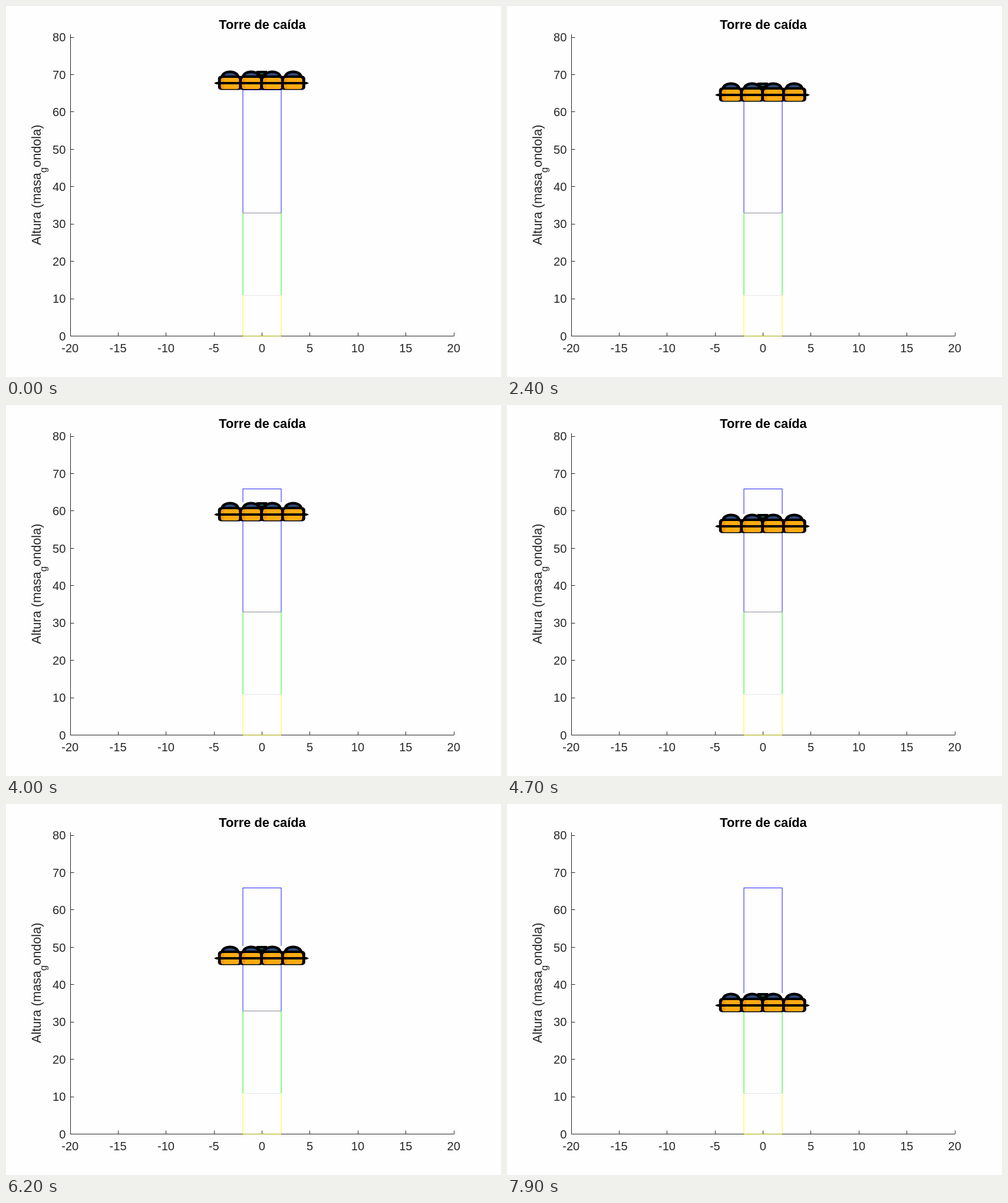
Write an HTML page that moves like this. It is 840 px wide and 630 px high and loops after 8000 ms.

```html
<!DOCTYPE html>
<html lang="es">
<head>
<meta charset="utf-8">
<title>Torre de caída</title>
<style>
  html, body { margin: 0; width: 100%; height: 100%; overflow: hidden; background: #fefefe; }
  svg { display: block; width: 840px; height: 630px; }
  text { font-family: "Liberation Sans", Arial, sans-serif; font-size: 20px; fill: #262626; }
  .title { font-size: 21.8px; font-weight: bold; fill: #000; text-anchor: middle; }
  .label { font-size: 21.7px; }
  .sub { font-size: 16.5px; }
  .x { text-anchor: middle; }
  .y { text-anchor: end; }
  .axes { stroke: #262626; fill: none; }
</style>
</head>
<body>
<svg viewBox="0 0 840 630">
  <defs>
    <g id="car">
      <path d="M-16 120C-14 106 14 106 16 120Z"/>
      <path d="M-10 118C-7 112.5 7 112.5 10 118Z" fill="#2f4b7c"/>
      <rect x="-20.5" y="118.5" width="41" height="24" rx="5"/>
      <rect x="-15.5" y="122" width="31" height="19" rx="4" fill="#ffab12"/>
      <path d="M-10 122h-1.5a4 4 0 0 0-4 4v11a4 4 0 0 0 4 4h1.5z" fill="#ee9a18"/>
    </g>
  </defs>

  <text class="title" x="435" y="39">Torre de caída</text>
  <text class="label" transform="translate(59 406) rotate(-90)">Altura (masa<tspan class="sub" dy="9.5">g</tspan><tspan dy="-9.5">ondola)</tspan></text>

  <path id="axes" class="axes"/>
  <g id="ticks"></g>

  <g id="tower" fill="none"></g>

  <g id="gondola">
    <rect x="354" y="110" width="160" height="32" fill="#fefefe"/>
    <path d="M425 110h18v9h-18z"/>
    <path d="M431 114h6v2h-6z" fill="#1c5560"/>
    <use href="#car" x="380.2"/>
    <use href="#car" x="416"/>
    <use href="#car" x="451.8"/>
    <use href="#car" x="487.3"/>
    <path d="M353 131l4-2h153l4 2l-4 2H357z"/>
  </g>
</svg>
<script>
  const STEP = 100, LOOP = 8000;
  const px = x => 434.5 + x * 16.275;
  const py = y => 560.5 - y * 6.342;
  const get = id => document.getElementById(id);

  function add(parent, tag, attrs, text = "") {
    const el = document.createElementNS("http://www.w3.org/2000/svg", tag);
    for (const key in attrs) el.setAttribute(key, attrs[key]);
    el.textContent = text;
    parent.append(el);
  }

  // Axes with inward ticks
  const snap = v => Math.floor(v) + 0.5;
  let d = "M109.5 48V560.5H760";
  for (let v = -20; v <= 20; v += 5) {
    d += `M${snap(px(v))} 560.5v-6`;
    add(get("ticks"), "text", { class: "x", x: px(v) - 0.3, y: 588 }, v);
  }
  for (let v = 0; v <= 80; v += 10) {
    d += `M109.5 ${snap(py(v))}h6`;
    add(get("ticks"), "text", { class: "y", x: 101.3, y: Math.round(py(v) + 7.2) }, v);
  }
  get("axes").setAttribute("d", d);

  // Tower sections: side colour, then the colour of the upper edge
  const tower = get("tower");
  const line = (path, stroke) => add(tower, "path", { d: path, stroke });
  const sections = [
    [142, 351, "#1c1cf4", "#2828fa"],
    [351, 491, "#1cf41c", "#8c8c98"],
    [491, 560, "#fafa30", "#e6e6e6"]
  ];
  for (const [top, bottom, side, edge] of sections) {
    line(`M402 ${top}V${bottom}M467 ${top}V${bottom}`, side);
    line(`M402 ${top + 0.5}H467`, edge);
  }
  line("M402 560.5H467", "#a8a800");

  // Free fall with slight drag, in pixels
  const fall = s => Math.round(3.457 * s * s * (1 - 0.0025 * s) - 0.1);

  const gondola = get("gondola");
  function draw(now) {
    const t = Math.floor((now % LOOP) / STEP) * STEP / 1000;
    gondola.setAttribute("transform", `translate(0 ${fall(t)})`);
    requestAnimationFrame(draw);
  }
  draw(0);
</script>
</body>
</html>
```
